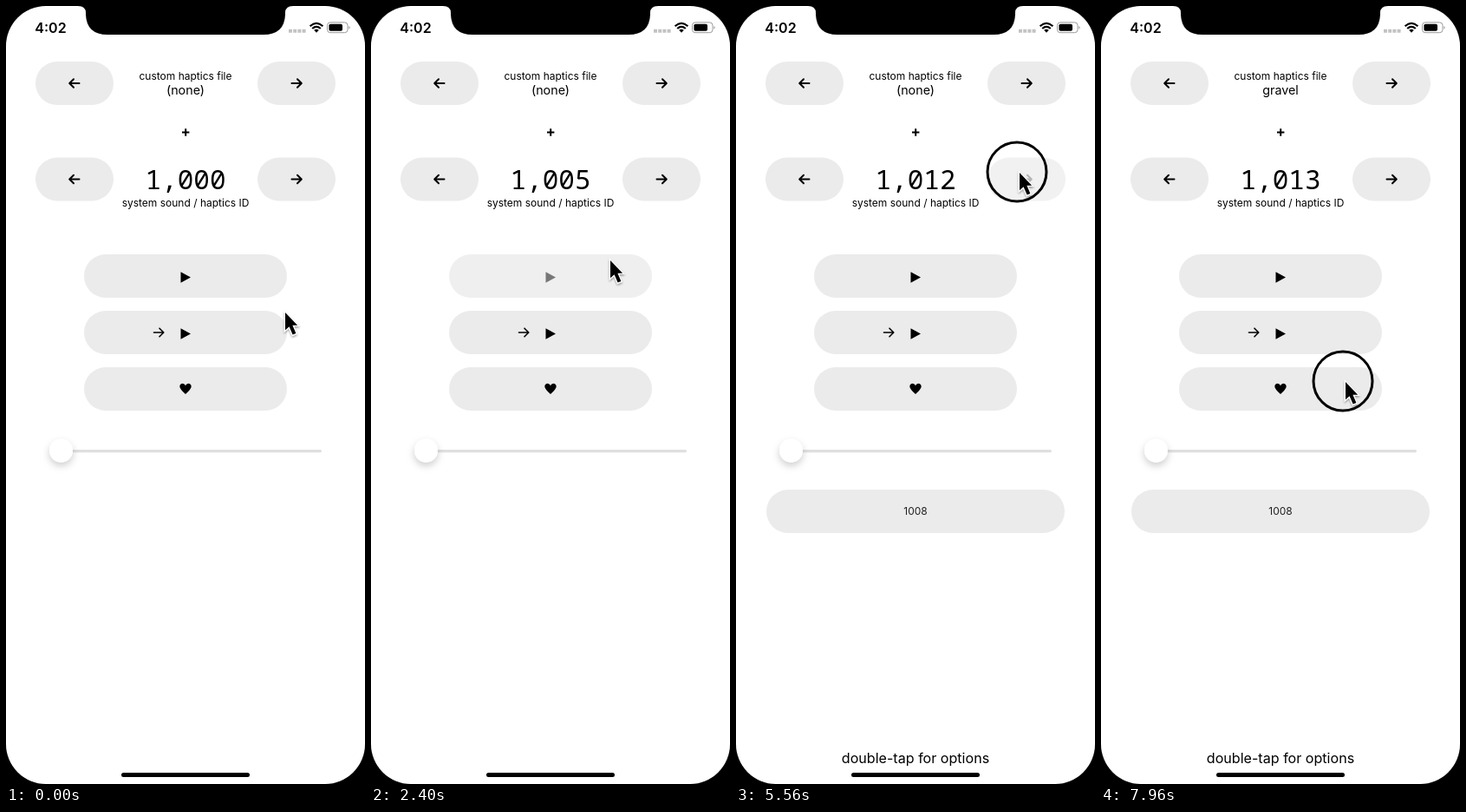
An HTML page that plays this animation: 414 by 896 pixels, repeating every 8000 ms.

```html
<!DOCTYPE html>
<html lang="en">
<head>
<meta charset="utf-8">
<title>Haptics tester</title>
<style>
  html, body { margin: 0; width: 100%; height: 100%; overflow: hidden; background: #000; }
  svg { display: block; width: 100vw; height: 100vh; }
  text { font-family: Inter, sans-serif; text-anchor: middle; }
  .pill { fill: #ebebeb; }
  .line { fill: none; stroke: #000; stroke-width: 2; stroke-linecap: round; stroke-linejoin: round; }
  .thin { stroke-width: 1.6; }
  #number { font: 31px "Noto Sans Mono", monospace; }
</style>
</head>
<body>
<svg viewBox="0 0 414 896">
  <defs>
    <path id="arrow" d="M-5.5 0H5.5M1 -4.8L5.8 0L1 4.8"/>
    <path id="play" d="M-5.5 -6.3L6 0L-5.5 6.3Z"/>
    <filter id="soft" x="-60%" y="-60%" width="220%" height="220%">
      <feDropShadow dx="0" dy="4" stdDeviation="4.5" flood-opacity=".2"/>
    </filter>
    <filter id="drop" x="-50%" y="-50%" width="200%" height="200%">
      <feDropShadow dx="0" dy="1.5" stdDeviation="1.3" flood-opacity=".4"/>
    </filter>
  </defs>

  <rect width="414" height="896" fill="#000"/>
  <rect width="414" height="896" rx="46" fill="#fff"/>
  <path d="M83 0Q92 0 92 8V10Q93 33 117 33H297Q321 33 322 10V8Q322 0 331 0Z"/>

  <text x="51.5" y="30.5" font-size="16" font-weight="600">4:02</text>
  <path d="M326 28.8H346" stroke="#c2c2c2" stroke-width="4" stroke-dasharray="4 1.2"/>
  <g fill="none" stroke="#000" stroke-width="2.2">
    <path d="M350.6 23.2Q358 16.6 365.4 23.2M353.2 26Q358 21.8 362.8 26"/>
    <path d="M355.2 27.8Q358 25.6 360.8 27.8L358 30.8Z" fill="#000" stroke="none"/>
  </g>
  <rect x="370.5" y="18.9" width="23.5" height="11.8" rx="3.4" fill="none" stroke="#999"/>
  <rect x="372.4" y="20.8" width="15.6" height="8" rx="1.8"/>
  <path d="M395.4 23Q398 24.8 395.4 26.8Z" fill="#999"/>

  <g id="buttons"></g>

  <text x="207" y="84.5" font-size="12">custom haptics file</text>
  <text id="file" x="207" y="102" font-size="14.3"></text>
  <path class="line" style="stroke-linecap:butt" d="M203 145.5H211.4M207.2 141.3V149.7"/>
  <text id="number" x="207" y="210.5"></text>
  <text x="207" y="231" font-size="12">system sound / haptics ID</text>

  <rect x="50" y="511" width="314" height="3.2" rx="1.6" fill="#dfdfdf"/>
  <circle cx="63.5" cy="512" r="13.5" fill="#fff" filter="url(#soft)"/>

  <g id="saved">
    <rect class="pill" x="35" y="557" width="344" height="50" rx="25"/>
    <text x="207" y="586.3" font-size="12" fill="#222">1008</text>
    <text x="207" y="871.5" font-size="16.1">double-tap for options</text>
  </g>
  <rect x="133" y="883" width="148" height="5" rx="2.5"/>

  <g id="pointer">
    <circle id="touch" cx="-3" cy="-1" r="20" fill="#808080" fill-opacity=".45" stroke="#000" stroke-opacity=".5"/>
    <circle id="ring" cx="-3" cy="-1" r="34" fill="none" stroke="#000" stroke-width="3"/>
    <path d="M0 0V20.3L4.6 16.3L8.6 25.6L12.4 24L8.4 14.8H14.2Z" stroke="#fff" stroke-width="2.4"
      paint-order="stroke" filter="url(#drop)"/>
  </g>
</svg>

<script>
const LOOP = 8000, STEP = 40;
const PRESS = 140, RELEASE = 220, FADE = 350;
const $ = id => document.getElementById(id);

const arrow = (x, y, flip = 1, style = "") =>
  `<use href="#arrow" class="line ${style}" transform="translate(${x} ${y}) scale(${flip} 1)"/>`;
const play = y => `<use href="#play" x="207" y="${y}"/>`;
const heart = `<path d="M207 447Q200.3 441 200.3 438.2C200.3 433.8 205.8 433.4 207 437.4
  C208.2 433.4 213.7 433.8 213.7 438.2Q213.7 441 207 447Z"/>`;

// Click times are the moments the pointer ring appears.
const buttons = {
  filePrev: { x: 34, y: 64, w: 90, icon: arrow(79, 89, -1), clicks: [] },
  fileNext: { x: 290, y: 64, w: 90, icon: arrow(335, 89), clicks: [6400, 7000] },
  idPrev: { x: 34, y: 174.5, w: 90, icon: arrow(79, 199.5, -1), clicks: [] },
  idNext: { x: 290, y: 174.5, w: 90, icon: arrow(335, 199.5),
    clicks: [610, 1010, 1150, 1290, 1430, 2820, 2950, 3080, 4740, 4960, 5140, 5320, 5500] },
  play: { x: 90, y: 286, w: 234, icon: play(312.5), clicks: [2050] },
  save: { x: 90, y: 351, w: 234, icon: arrow(176, 376, 1, "thin") + play(377.5), clicks: [3600] },
  heart: { x: 90, y: 416, w: 234, icon: heart, clicks: [7840] }
};
const allClicks = Object.values(buttons).flatMap(b => b.clicks);
const files = ["(none)", "heartbeat", "gravel"];

const path = [
  [0, 322, 353], [120, 322, 353], [560, 350, 205], [1640, 350, 205],
  [1800, 315, 272], [2000, 272, 320], [2250, 272, 320], [2400, 276, 293],
  [2620, 327, 198], [3280, 327, 198], [3520, 294, 345], [3600, 278, 392],
  [4340, 278, 392], [4480, 296, 287], [4680, 327, 192], [5820, 327, 192],
  [6160, 339, 98], [6280, 341, 88], [7260, 341, 88], [7660, 282, 433], [8000, 282, 433]
];

// Monotone cubic through the path: rests stay still, waypoints are passed smoothly.
const slope = (i, k) => i < 0 || i >= path.length - 1 ? 0
  : (path[i + 1][k] - path[i][k]) / (path[i + 1][0] - path[i][0]);
function tangent(i, k) {
  const a = slope(i - 1, k), b = slope(i, k);
  return a * b > 0 ? 2 * a * b / (a + b) : 0;
}
function along(t, k) {
  const i = Math.max(0, path.findIndex(p => p[0] > t) - 1);
  const p = path[i], q = path[i + 1], h = q[0] - p[0], u = (t - p[0]) / h;
  const s = u * u * (3 - 2 * u);
  return p[k] + (q[k] - p[k]) * s
    + h * u * (1 - u) * ((1 - u) * tangent(i, k) - u * tangent(i + 1, k));
}

const clamp = v => Math.min(1, Math.max(0, v));
const done = (button, t) => button.clicks.filter(c => t >= c + RELEASE).length;
function iconAlpha(button, t) {
  const last = button.clicks.filter(c => t >= c + PRESS).pop();
  return last === undefined ? 1 : .2 + .8 * clamp((t - last - RELEASE) / FADE);
}

$("buttons").innerHTML = Object.values(buttons).map(b =>
  `<g><rect class="pill" x="${b.x}" y="${b.y}" width="${b.w}" height="50" rx="25"/><g>${b.icon}</g></g>`).join("");
Object.values(buttons).forEach((b, i) => [b.pill, b.mark] = $("buttons").children[i].children);

function render(t) {
  for (const b of Object.values(buttons)) {
    const a = iconAlpha(b, t);
    b.mark.setAttribute("opacity", a);
    b.pill.setAttribute("opacity", .6 + .4 * a);
  }
  $("number").textContent = (1000 + done(buttons.idNext, t)).toLocaleString("en-US");
  $("file").textContent = files[done(buttons.fileNext, t)];
  $("saved").setAttribute("opacity", clamp((t - buttons.save.clicks[0] - RELEASE) / 200));

  $("pointer").setAttribute("transform", `translate(${along(t, 1)} ${along(t, 2)})`);
  const ringing = allClicks.find(c => t >= c && t < c + PRESS);
  $("ring").setAttribute("opacity", ringing === undefined ? 0 : clamp(.3 + (t - ringing) / 60));
  const touching = allClicks.some(c => t >= c + PRESS && t < c + RELEASE + 10);
  $("touch").setAttribute("opacity", touching ? 1 : 0);
}

const start = performance.now();
function tick() {
  const t = (performance.now() - start) % LOOP;
  render(Math.floor(t / STEP) * STEP);
  requestAnimationFrame(tick);
}
render(0);
tick();
</script>
</body>
</html>
```
